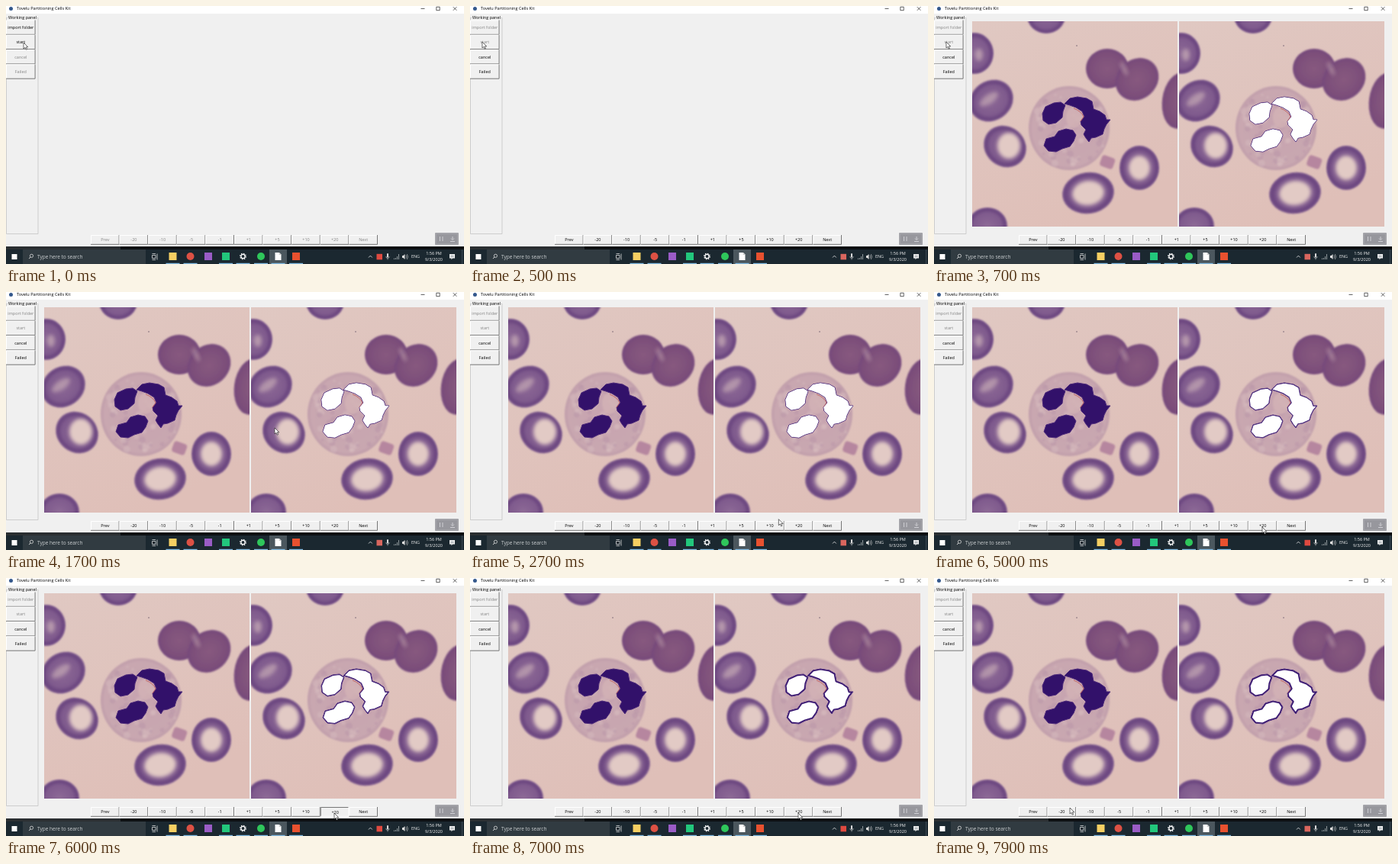
Write an HTML page that moves like this. It is 600x338 px and loops after 8 s.

```html
<!DOCTYPE html>
<html lang="en">
<head>
<meta charset="utf-8">
<title>Cell viewer</title>
<style>
  html, body { margin: 0; width: 100%; height: 100%; overflow: hidden; background: #f0f0f0; }
  svg { display: block; width: 600px; height: 338px; }
  text { font: 5.5px "Open Sans", "Noto Sans", sans-serif; fill: #000; }
  .mid { text-anchor: middle; }
  .off { fill: #858585; }
  .bar text { fill: #f2f2f2; }
</style>
</head>
<body>
<svg viewBox="0 0 600 338" xmlns="http://www.w3.org/2000/svg">
  <defs>
    <linearGradient id="slide" x1="0" y1="0" x2=".5" y2="1">
      <stop offset="0" stop-color="#e0c8c2"/><stop offset="1" stop-color="#dfbfb8"/>
    </linearGradient>
    <radialGradient id="violet">
      <stop offset="0" stop-color="#8d6a96"/><stop offset=".7" stop-color="#7f5a8d"/>
      <stop offset=".88" stop-color="#6b467f"/><stop offset="1" stop-color="#7a568c"/>
    </radialGradient>
    <radialGradient id="plum">
      <stop offset="0" stop-color="#87597f"/><stop offset=".75" stop-color="#7d4f7a"/>
      <stop offset="1" stop-color="#75497b"/>
    </radialGradient>
    <radialGradient id="plasma">
      <stop offset="0" stop-color="#c7a4b0"/><stop offset=".9" stop-color="#c9a7b0"/>
      <stop offset="1" stop-color="#bf9daa"/>
    </radialGradient>
    <filter id="soft" x="-10%" y="-10%" width="120%" height="120%"><feGaussianBlur stdDeviation="1"/></filter>
    <filter id="haze" x="-40%" y="-40%" width="180%" height="180%"><feGaussianBlur stdDeviation="2.6"/></filter>
    <filter id="edge"><feGaussianBlur stdDeviation=".5"/></filter>
    <clipPath id="pane"><rect x="50" y="20" width="269" height="269"/></clipPath>
    <path id="nucleus" d="M142 141L146 132 157 127 166 126 172 130 169 138 168 146 160 153 150 155 143 150Z
      M171 128L178 121 188 119 200 121 207 125 209 135 217 138 224 143 226 149 231 149 226 155 223 161 221 168 212 172 206 173 203 178 199 173 196 168 199 162 193 156 192 151 197 145 194 138 186 133 178 130Z
      M144 183L147 174 158 171 163 164 173 161 182 163 186 169 183 177 178 184 168 187 160 191 150 190Z"/>
    <clipPath id="inside"><use href="#nucleus"/></clipPath>
    <g id="photo" clip-path="url(#pane)">
      <rect x="50" y="20" width="269" height="269" fill="url(#slide)"/>
      <g id="cells"></g>
      <use href="#nucleus" fill="#32116a" stroke="#4b2879" stroke-width="1" stroke-linejoin="round" filter="url(#edge)"/>
      <path d="M183 134Q193 138 196 145L192 151" fill="none" stroke="#c0605f" stroke-width=".9"/>
    </g>
  </defs>

  <rect width="600" height="338" fill="#f0f0f0"/>
  <rect width="600" height="10" fill="#fff"/>
  <circle cx="6.5" cy="3.6" r="2.5" fill="#34588c"/>
  <text x="14" y="5.4" style="font-size:5.6px">Tovelu Partitioning Cells Kit</text>
  <path d="M543.5 3.5h5M563.8 1.3h4.4v4.4h-4.4zM585.8 1.2l4.6 4.6m0-4.6l-4.6 4.6" fill="none" stroke="#222" stroke-width=".7"/>
  <path d="M2 15.5H.5V298.5H42V15.5H40.5" fill="none" stroke="#c4c4c4" stroke-width=".8"/>
  <text x="3" y="17">Working panel</text>
  <g id="buttons"></g>

  <g id="result">
    <use href="#photo"/>
    <g transform="translate(271)">
      <use href="#photo"/>
      <g clip-path="url(#inside)">
        <use href="#nucleus" fill="#fff"/>
        <use id="rim" href="#nucleus" fill="none" stroke="#37156f" stroke-linejoin="round"/>
      </g>
    </g>
  </g>

  <rect x="562" y="297" width="31" height="16" rx="1" fill="#a3a3a8"/>
  <rect x="564" y="299" width="27" height="12" fill="#97979d"/>
  <path d="M568.5 302v6m3.5-6v6M585 302v4m-2-1.5l2 2 2-2M582 308.5h6" fill="none" stroke="#cfcfd4" stroke-width="1"/>

  <g class="bar">
    <rect y="315" width="600" height="23" fill="#0b0e11"/>
    <rect y="315" width="150" height="4" fill="#2a2e31"/>
    <rect y="319" width="600" height="19" fill="#1b2830"/>
    <rect x="22" y="319" width="161" height="19" fill="#313b41"/>
    <rect x="7.5" y="325" width="7" height="7" fill="#fff"/>
    <path d="M30 331l2.2-2.2" stroke="#ddd" stroke-width=".9"/>
    <circle cx="33.5" cy="327.3" r="2.1" fill="none" stroke="#ddd" stroke-width=".8"/>
    <text x="41" y="330.8" style="font-size:6.5px;fill:#cbcfd1">Type here to search</text>
    <path d="M191.5 326.5h4.5v4h-4.5zM191.5 324.5h4.5M191.5 332.5h4.5M198 324.5v8" fill="none" stroke="#ddd" stroke-width=".8"/>
    <rect x="345" y="319" width="23" height="19" fill="#4b575e"/>
    <g id="apps"></g>
    <circle cx="310.5" cy="328" r="2.6" fill="none" stroke="#fff" stroke-width="1.3"/>
    <circle cx="310.5" cy="328" r="3.8" fill="none" stroke="#fff" stroke-width="1.2" stroke-dasharray="1.5 1.485"/>
    <path d="M352.5 323h5.5l2.5 2.5v7.5h-8z" fill="#fff"/>
    <path d="M358 323v2.5h2.5" fill="none" stroke="#aaa" stroke-width=".6"/>
    <path d="M475 329.5l2.4-2.4 2.4 2.4" fill="none" stroke="#eee" stroke-width=".8"/>
    <rect id="lamp" x="485.5" y="324.8" width="7.5" height="7.5"/>
    <path d="M500 325v3.5" stroke="#ddd" stroke-width="2" stroke-linecap="round"/>
    <path d="M497.8 328q0 2.4 2.2 2.4t2.2-2.4M500 330.4v2" fill="none" stroke="#ddd" stroke-width=".6"/>
    <path d="M508.5 332v-1.5m2-.5v2m2-4v4m2-7v7" stroke="#8f979b" stroke-width="1"/>
    <path d="M519 327h1.5l2-2v7l-2-2H519z" fill="#ddd"/>
    <path d="M524 326.5q1.4 2 0 4m1.4-5.4q2.2 3.4 0 6.8" fill="none" stroke="#ddd" stroke-width=".6"/>
    <text x="536.5" y="330.3" class="mid">ENG</text>
    <text x="560.5" y="326.4" class="mid">1:56 PM</text>
    <text x="560.5" y="334.4" class="mid">9/3/2020</text>
    <path d="M581 325h7v5.5h-3l-1.5 1.8v-1.8H581z" fill="#f2f2f2"/>
    <path d="M582.3 327h4.4m-4.4 1.6h4.4" stroke="#53606a" stroke-width=".5"/>
    <path d="M597.5 319v19" stroke="#52606a" stroke-width=".6"/>
  </g>
  <path id="cursor" d="M0 0V8L1.9 6.3 3.2 9.2 4.5 8.6 3.3 5.8H5.8Z" fill="#fff" stroke="#111" stroke-width=".6"/>
</svg>

<script>
const $ = id => document.getElementById(id);

function add(parent, tag, attrs, text) {
  const el = document.createElementNS("http://www.w3.org/2000/svg", tag);
  for (const k in attrs) el.setAttribute(k, attrs[k]);
  if (text) el.textContent = text;
  return parent.appendChild(el);
}

// Blood cells, some with a pale centre
const cells = $("cells");
function cell(tone, cx, cy, rx, ry, angle = 0) {
  add(cells, "ellipse", {
    cx, cy, rx, ry, fill: `url(#${tone})`, filter: "url(#soft)", transform: `rotate(${angle} ${cx} ${cy})`
  });
}
function pale(cx, cy, rx, ry, angle = 0, opacity = 1) {
  add(cells, "ellipse", {
    cx, cy, rx, ry, opacity, fill: "#e2cac5", filter: "url(#haze)", transform: `rotate(${angle} ${cx} ${cy})`
  });
}
cell("violet", 147, 13, 25, 23);
cell("violet", 53, 62, 25, 27);
pale(59, 64, 5, 8, 0, .5);
cell("violet", 75, 124, 30, 26, -35);
pale(72, 122, 14, 6, -35, .45);
cell("violet", 93, 184, 29, 26, 40);
pale(98, 183, 15, 17);
cell("plum", 227, 82, 28, 26);
cell("plum", 266, 96, 30, 26, -42);
pale(249, 82, 3, 10, -25, .4);
cell("plum", 322, 124, 23, 37, 8);
cell("violet", 269, 212, 26, 29);
pale(269, 212, 14, 16);
cell("violet", 202, 245, 34, 27, -8);
pale(202, 245, 21, 16, -8);
cell("violet", 70, 288, 26, 24);
add(cells, "rect", { x: 218, y: 197, width: 18, height: 15, rx: 4, fill: "#b6869f", filter: "url(#soft)", transform: "rotate(20 227 205)" });
add(cells, "circle", { cx: 187, cy: 52, r: 1, fill: "#a08a90" });
add(cells, "ellipse", { cx: 177, cy: 160, rx: 53, ry: 55, fill: "url(#plasma)", filter: "url(#soft)" });

// Mottled cytoplasm
let seed = 7;
const rnd = () => (seed = seed * 16807 % 2147483647) / 2147483647;
const mottle = add(cells, "g", { filter: "url(#soft)" });
for (let i = 0; i < 80; i++) {
  const a = rnd() * 6.283, r = Math.sqrt(rnd()) * 50;
  add(mottle, "circle", {
    cx: 177 + r * Math.cos(a), cy: 160 + r * Math.sin(a), r: 1.5 + rnd() * 3,
    fill: i % 2 ? "#d8bcbe" : "#b592a6", opacity: .45
  });
}
add(mottle, "ellipse", { cx: 183, cy: 146, rx: 10, ry: 14, fill: "#d3b3b5", opacity: .8 });

// Tk style push buttons
function button(x, y, w, h, label) {
  const g = add($("buttons"), "g", {});
  add(g, "rect", { x, y, width: w, height: h, fill: "#f0f0f0" });
  const light = add(g, "path", { d: `M${x + .5} ${y + h}V${y + .5}H${x + w}`, fill: "none" });
  const dark = add(g, "path", { d: `M${x} ${y + h - .5}H${x + w - .5}V${y}`, fill: "none" });
  const text = add(g, "text", { x: x + w / 2, y: y + h / 2 + 1.9, class: "mid" }, label);
  return (enabled, down) => {
    light.setAttribute("stroke", down ? "#777" : "#fff");
    dark.setAttribute("stroke", down ? "#fff" : "#777");
    text.setAttribute("class", enabled ? "mid" : "mid off");
    text.setAttribute("transform", down ? "translate(.5 .5)" : "");
  };
}
const side = ["import folder", "start", "cancel", "Failed"].map((s, i) => button(0, 18.5 + i * 19.3, 38.6, 19.3, s));
const nav = ["Prev", "-20", "-10", "-5", "-1", "+1", "+5", "+10", "+20", "Next"]
  .map((s, i) => button(111 + i * 37.6, 300, 37.6, 12.8, s));

// Taskbar tiles: centre, colour, round
[[218.5, "#f6cf62"], [241.5, "#dd5144", 1], [265, "#9a5cc6"], [288, "#22c77c"],
 [334, "#2fc65b", 1], [380, "#e8512f"]].forEach(([x, fill, round]) =>
  add($("apps"), "rect", { x: x - 5, y: 323, width: 10, height: 10, rx: round ? 5 : 0, fill }));
[218.5, 241.5, 288, 310.5, 334, 356.5, 380].forEach(x =>
  add($("apps"), "rect", { x: x - 9, y: 336.8, width: 18, height: 1.2, fill: "#83bde6" }));

// Pointer: time, x, y
const path = [
  [0, 23, 48], [100, 23, 48], [300, 16, 47], [800, 16, 47], [900, 40, 54], [1100, 201, 121],
  [1200, 201, 121], [1500, 330, 171], [1700, 352, 178], [2100, 345, 193], [2200, 378, 250],
  [2300, 403, 297], [2900, 405, 298], [3300, 424, 305], [3600, 429, 307], [3900, 430, 308],
  [7100, 430, 308], [7300, 378, 311], [7600, 212, 306], [7900, 178, 301], [8000, 178, 301]
];
function pointer(t) {
  const i = path.findIndex(p => p[0] > t), [a, x, y] = path[i - 1], [b, u, v] = path[i];
  const k = (t - a) / (b - a);
  return [x + (u - x) * k, y + (v - y) * k];
}

// Each click on +20 shrinks the white mask
const rims = [[0, .3], [4200, .7], [4600, 1.1], [5000, 1.5], [5800, 2], [6500, 3.2]];
const presses = [[4000, 4200], [4500, 4600], [5300, 5800], [6000, 6500]];

function draw(now) {
  const t = Math.floor(now % 8000 / 100) * 100;
  const busy = t >= 200, ready = t >= 300;
  side.forEach((set, i) => set(i < 2 ? !busy : busy, i === 1 && t === 100));
  const down = presses.some(([a, b]) => t >= a && t < b);
  nav.forEach((set, i) => set(ready, i === 8 && down));
  $("result").style.display = t >= 700 ? "" : "none";
  $("rim").setAttribute("stroke-width", rims.filter(r => r[0] <= t).pop()[1]);
  $("lamp").setAttribute("fill", t % 1000 < 500 ? "#df4a40" : "#d9665e");
  $("cursor").setAttribute("transform", `translate(${pointer(t)})`);
}

let start;
function tick(now) {
  start ??= now;
  draw(Math.max(0, now - start));
  requestAnimationFrame(tick);
}
draw(0);
requestAnimationFrame(tick);
</script>
</body>
</html>
```
